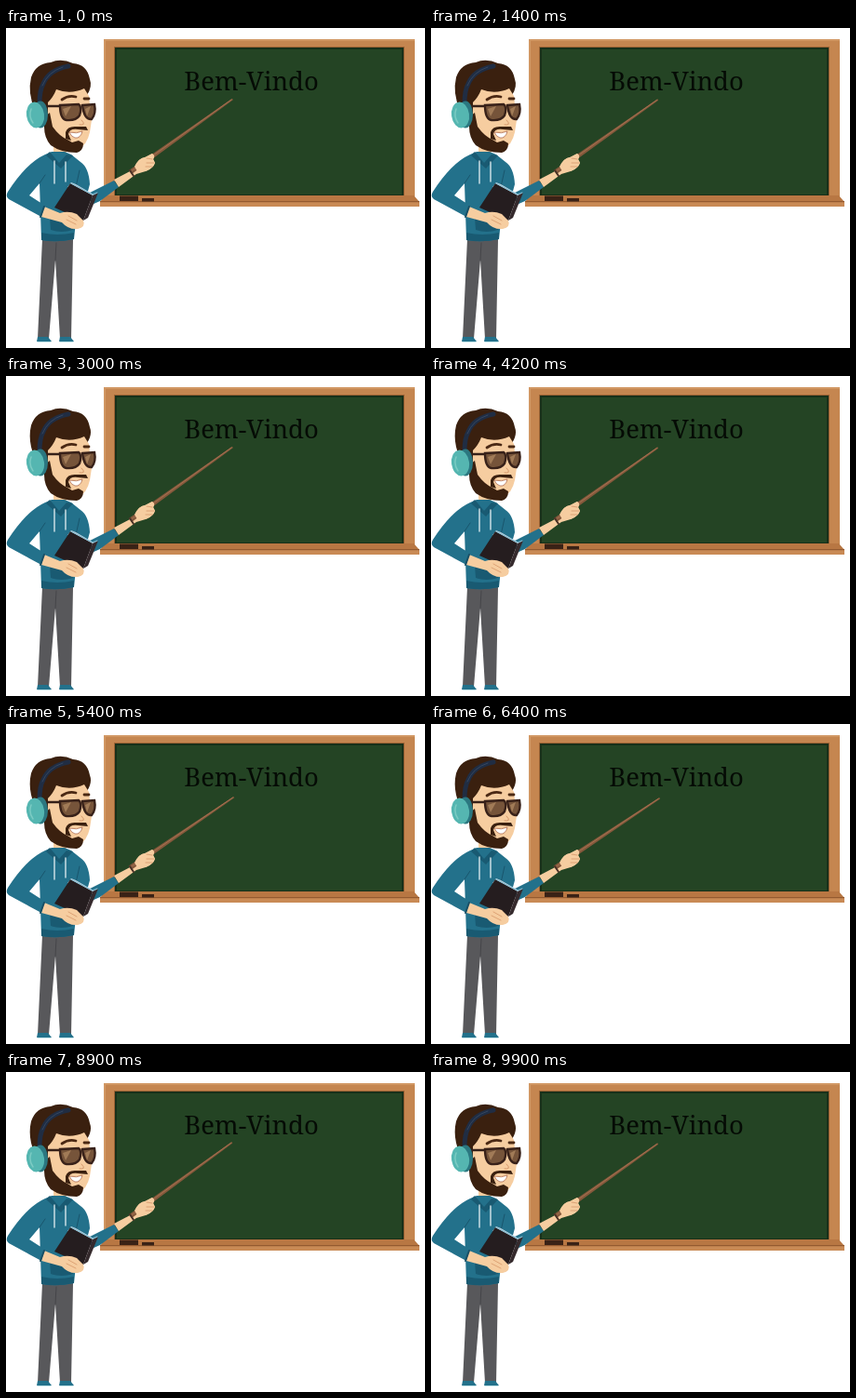
Animation, 450 px wide and 344 px high, one loop 10000 ms. Source, as an HTML page:

```html
<!DOCTYPE html>
<html lang="pt">
<head>
<meta charset="utf-8">
<title>Bem-Vindo</title>
<style>
html, body { margin: 0; width: 100%; height: 100%; overflow: hidden; background: #fff; }
svg { display: block; width: 450px; height: 344px; }
text { font: 27.4px "Noto Serif", serif; fill: #050b05; }
.skin { fill: #f6cda0; }
.hair { fill: #3a200f; }
.cloth { fill: #23718b; }
.shade { fill: #195a72; }
.line { fill: none; stroke-linecap: round; stroke-linejoin: round; }
</style>
</head>
<body>
<svg viewBox="0 0 450 344">
  <!-- board -->
  <path fill="#c58650" d="M105 12H439V181H105z"/>
  <path fill="#d19763" d="M105 12H439V14H107V181H105z"/>
  <path fill="#9a6134" d="M116 20H428V181H116z"/>
  <path fill="#183019" d="M117 21H427V181H117z"/>
  <path fill="#244424" d="M119 23H425V179H119z"/>
  <path fill="#b87743" d="M106 180H438L444 187H101z"/>
  <path fill="#c98a55" d="M101 186H444V192H101z"/>
  <path fill="#945a30" d="M101 186H444V187.3H101z"/>
  <path fill="#3a2216" d="M122 180.500H142V186H122zM146 183H159V186.500H146z"/>
  <text x="263.500" y="67" text-anchor="middle">Bem-Vindo</text>

  <!-- legs and shoes -->
  <path fill="#58585b" d="M39 227H72L70 334H58L53 249L46 334H34z"/>
  <path class="line" stroke="#454549" d="M54 231L53 250"/>
  <path class="cloth" d="M34 332H45L49 337H33zM58 332H69L73 337H57z"/>
  <path class="line" stroke="#bfe0e6" d="M34 337.500H48M58 337.500H72"/>

  <!-- body -->
  <path class="skin" d="M51 117H65V143H51z"/>
  <path class="cloth" d="M42 136Q22 145 2 176Q-1 181 3 184L38 203L42 191L25 180L36 167L38 228Q55 231 73 227L75 208L84 190L90 168Q89 150 80 144L70 136L63 133L49 133z"/>
  <path class="shade" d="M47 204H70L72 217Q59 221 48 217zM38 220Q55 224 73 220V227Q55 231 38 228z"/>
  <path class="shade" d="M47 133L57 145L65 136L72 137L59 151L43 137z"/>
  <path class="line" stroke="#174f65" stroke-width=".8" d="M36 167L42 158M75 171L79 153"/>
  <path class="line" stroke="#e3eff1" stroke-width="1.300" d="M52 143V167M64 144V165"/>

  <!-- pointing arm -->
  <path class="cloth" d="M88 178L116 164L121 171L101 186L92 190z"/>
  <path class="skin" d="M116 163L137 152L140 146Q143 140 149 139L157 135Q161 137 158 141L160 145Q158 151 150 154L140 157L121 171z"/>
  <g id="stick">
    <path fill="#85593c" d="M132 153L243 75.800L243.800 77.200L135 157z"/>
    <path class="line" stroke="#ad7857" stroke-width=".8" d="M135 153.500L242 77"/>
  </g>
  <path class="skin" d="M138 149Q142 140 150 139L157 135Q161 137 158 141L160 145Q158 151 150 154L141 154z"/>
  <path class="line" stroke="#d99c70" stroke-width=".9" d="M151 140L157 141M151 145L159 145M150 149L157 149"/>
  <path class="line" stroke="#493126" stroke-width="2" d="M133 153L137 159"/>

  <!-- book -->
  <path fill="#c9d5df" d="M70 166L75 168L94 179L98 178L94 184L66 171z"/>
  <path fill="#251d1f" d="M69 167L93 180L83 207L52 193z"/>
  <path fill="#352a2d" d="M93 180L99 177L88 204L83 207z"/>
  <path class="line" stroke="#84bdd2" stroke-width="1.200" d="M70 167L93 179L98 177"/>
  <path class="skin" d="M41 192L58 199Q67 196 76 200L83 207Q86 214 77 216Q67 217 60 209L38 203z"/>
  <path class="line" stroke="#db9d70" stroke-width=".9" d="M67 202L76 207M65 206L75 211"/>
  <path class="line" stroke="#174f65" stroke-width="2" d="M41 192L37 203"/>

  <!-- head -->
  <path class="hair" d="M31 88Q23 70 27 53Q32 38 48 37Q59 32 72 38Q87 39 90 55Q93 63 87 72L75 80L46 101L39 101z"/>
  <path class="skin" d="M45 80Q51 74 54 66Q69 72 84 65L89 73L92 99L90 112Q87 126 77 131Q60 130 45 113z"/>
  <path class="hair" d="M41 96L47 91L50 106Q57 116 66 120L71 123L78 121L83 124Q83 132 76 134Q59 134 48 126Q41 118 41 106z"/>
  <path class="hair" d="M64 112Q66 105 76 106L86 106L88 110L77 109Q68 108 67 114L70 121L64 119z"/>
  <path fill="#fff" stroke="#a65f43" stroke-width=".7" d="M68 112Q76 114 82 111Q80 119 74 118Q70 117 68 112z"/>
  <path class="line" stroke="#d69a6d" d="M81 99Q87 105 79 104"/>
  <path class="line" stroke="#4b2914" stroke-width="2.800" d="M60 77Q67 72 75 74M84 76L89 76"/>
  <path class="line" stroke="#362019" stroke-width="2.500" d="M43 84L59 84"/>
  <g fill="#76543a" stroke="#382119" stroke-width="2.400">
    <path d="M58 83L78 82Q82 85 79 94Q75 100 65 99Q58 98 58 83z"/>
    <path d="M82 83L95 82Q97 92 92 98Q84 99 82 83z"/>
  </g>
  <path fill="#a17b57" d="M61 87L70 84L64 95zM85 87L91 84L87 95z"/>
  <path class="line" stroke="#202d43" stroke-width="5" d="M67 41Q46 45 40 60Q36 67 36 81"/>
  <path class="line" stroke="#354760" stroke-width="1" d="M61 42Q45 47 39 62"/>
  <ellipse cx="37" cy="93" rx="8" ry="14.500" fill="#2b7780"/>
  <ellipse cx="31.500" cy="93.500" rx="9.500" ry="14" fill="#55b6b1" transform="rotate(-8 31.500 93.500)"/>
  <path class="line" stroke="#7bcbc3" stroke-width="1.500" d="M27 87Q24 95 29 102"/>
</svg>
<script>
const loop = 10000;
// time in ms, pointer angle in degrees
const poses = [[0, 0], [1400, .3], [3000, 0], [4200, .3], [6400, 2], [8000, -1.1], [9900, .3], [loop, 0]];
const stick = document.getElementById("stick");

function angleAt(t) {
  const i = poses.findIndex(p => p[0] > t);
  const [t0, a0] = poses[i - 1], [t1, a1] = poses[i];
  const u = (t - t0) / (t1 - t0);
  return a0 + (a1 - a0) * u * u * (3 - 2 * u);
}

function draw(now) {
  const t = Math.floor(now % loop / 100) * 100;
  stick.setAttribute("transform", `rotate(${angleAt(t)} 149 143)`);
  requestAnimationFrame(draw);
}
requestAnimationFrame(draw);
</script>
</body>
</html>
```
